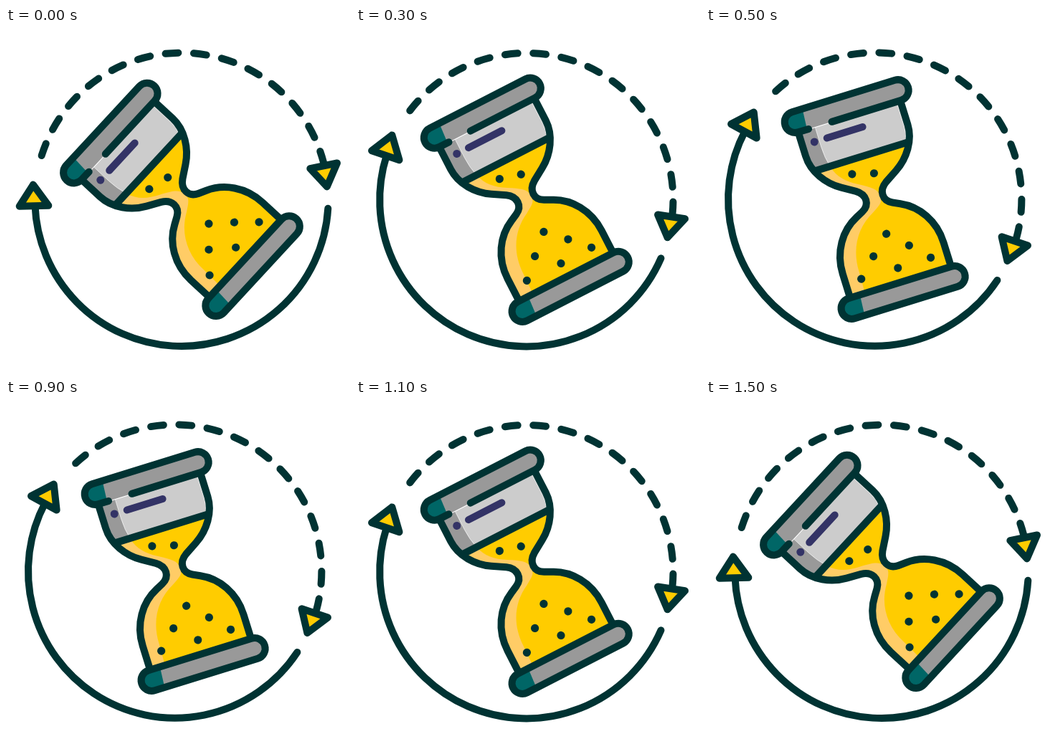
Animation of 480x480 px, one loop 1.6 s. Source, as an HTML page with a canvas:

```html
<!DOCTYPE html>
<html lang="en">
<head>
<meta charset="utf-8">
<title>Turning hourglass</title>
<style>
html, body { margin: 0; width: 100%; height: 100%; overflow: hidden; background: #fff; }
canvas { display: block; width: 100vmin; height: 100vmin; }
</style>
</head>
<body>
<canvas id="stage" width="480" height="480"></canvas>
<script>
const ctx = document.getElementById('stage').getContext('2d');
const INK = '#003333', TEAL = '#006666', STEEL = '#999999', GLASS = '#cccccc';
const SAND = '#ffcc00', AMBER = '#ffcc66', PLUM = '#333366';
const RING = 204.7, CAP = 14.7, RAD = Math.PI / 180;
const STEP_MS = 200, POSES = 8;

// Centre of the figure for each 10 degree step of the swing
const centres = [[245, 239.3], [240.3, 239], [237.8, 239.7], [235.7, 239], [240.5, 238.8]];

// One side of the glass: upper bulb, rounded neck, lower bulb
const side = s => `M${74.5 * s},-120 L${74.5 * s},-86 C${74.5 * s},-63 ${59 * s},-41 ${40 * s},-29.5 ` +
  `L${22 * s},-18.5 C${9 * s},-10 ${9 * s},5 ${22 * s},11.5 ` +
  `L${32 * s},16.5 C${56 * s},28 ${73.7 * s},54 ${73.7 * s},86 L${73.7 * s},120`;
const sides = new Path2D(side(1) + ' ' + side(-1));

const bulbs = new Path2D();
for (const s of [1, -1]) bulbs.addPath(new Path2D(side(s) + ' L0,120 L0,-120 Z'));

const shade = new Path2D('M-90,-62 L-46,-62 C-42,-46 -32,-36 -16,-27 C0,-18 8,-12 8,-4 L8,2 ' +
  'C8,8 0,12 -8,17 C-34,30 -51,56 -51,90 L-52,121 L-90,121 Z');
const topShade = new Path2D('M-90,-122 L-50,-122 L-50,-92 Q-50,-76 -46,-62 L-90,-62 Z');
const pane = new Path2D('M-50,-120 L-50,-92 Q-50,-76 -46,-62 M69,-116 L69,-84 Q69,-74 65,-65');

const grains = [[-20, -43], [9.5, -35], [1, 50.8], [-25.5, 75.4], [26.5, 75.6],
  [-51, 100.5], [2.3, 101], [50.3, 100.7]];
const leftArrow = [[-125.5, -166], [-160.7, -159.6], [-132.4, -130.5]];
const rightArrow = [[151, 136.7], [153.5, 102.3], [184.7, 124.7]];

function fill(path, colour) {
  ctx.fillStyle = colour;
  ctx.fill(path);
}

function stroke(path, colour = INK, width = 10) {
  ctx.strokeStyle = colour;
  ctx.lineWidth = width;
  ctx.stroke(path);
}

function dot(x, y, r, colour) {
  const p = new Path2D();
  p.arc(x, y, r, 0, 2 * Math.PI);
  fill(p, colour);
}

function ringArc(from, to) {
  const p = new Path2D();
  p.arc(0, 0, RING, from * RAD, to * RAD);
  stroke(p);
}

function arrow(points) {
  const p = new Path2D('M' + points.join(' L') + ' Z');
  fill(p, SAND);
  stroke(p);
}

function drawRing() {
  ringArc(50.7, 225);
  for (let i = 0; i < 13; i++) {
    const mid = 247.1 + 11.05 * i;
    ringArc(mid - 2.5, mid + 2.5);
  }
  ringArc(388, 392.5);
  arrow(leftArrow);
  arrow(rightArrow);
}

function drawBar(x1, x2, y, gap) {
  const body = new Path2D();
  body.arc(x2, y, CAP, -90 * RAD, 90 * RAD);
  body.arc(x1, y, CAP, 90 * RAD, 270 * RAD);
  body.closePath();
  fill(body, STEEL);
  ctx.save();
  ctx.clip(body);
  fill(new Path2D(`M-100,${y - 20} L-59,${y - 20} L-62,${y + 20} L-100,${y + 20} Z`), TEAL);
  ctx.restore();
  if (!gap) return stroke(body);

  const open = new Path2D();
  open.moveTo(gap[1], y + CAP);
  open.arc(x2, y, CAP, 90 * RAD, -90 * RAD, true);
  open.arc(x1, y, CAP, 270 * RAD, 90 * RAD, true);
  open.lineTo(gap[0], y + CAP);
  stroke(open);
}

function drawGlass() {
  ctx.save();
  ctx.clip(bulbs);
  ctx.fillStyle = GLASS;
  ctx.fillRect(-90, -122, 180, 60);
  ctx.fillStyle = SAND;
  ctx.fillRect(-90, -62, 180, 184);
  fill(topShade, STEEL);
  fill(shade, AMBER);
  stroke(pane, '#ffffff', 0.6);
  ctx.restore();

  stroke(new Path2D('M-67,-62.5 L67,-62.5'));
  stroke(sides);
  for (const [x, y] of grains) dot(x, y, 5.6, INK);
  stroke(new Path2D('M-38.7,-101.5 L13.5,-101.5'), PLUM);
  dot(-57, -101.5, 5.5, PLUM);
  drawBar(-74.5, 75.8, -135.8, [-59.5, -25.5]);
  drawBar(-76, 74.4, 135.8);
}

function frame(now) {
  const n = Math.floor((now + STEP_MS / 2) / STEP_MS) % POSES;
  const pose = 4 - Math.abs(4 - n);
  ctx.setTransform(1, 0, 0, 1, 0, 0);
  ctx.fillStyle = '#ffffff';
  ctx.fillRect(0, 0, 480, 480);
  ctx.lineCap = ctx.lineJoin = 'round';
  ctx.translate(...centres[pose]);
  ctx.rotate((-47.2 + 10 * pose) * RAD);
  drawRing();
  drawGlass();
  requestAnimationFrame(frame);
}

frame(0);
</script>
</body>
</html>
```
